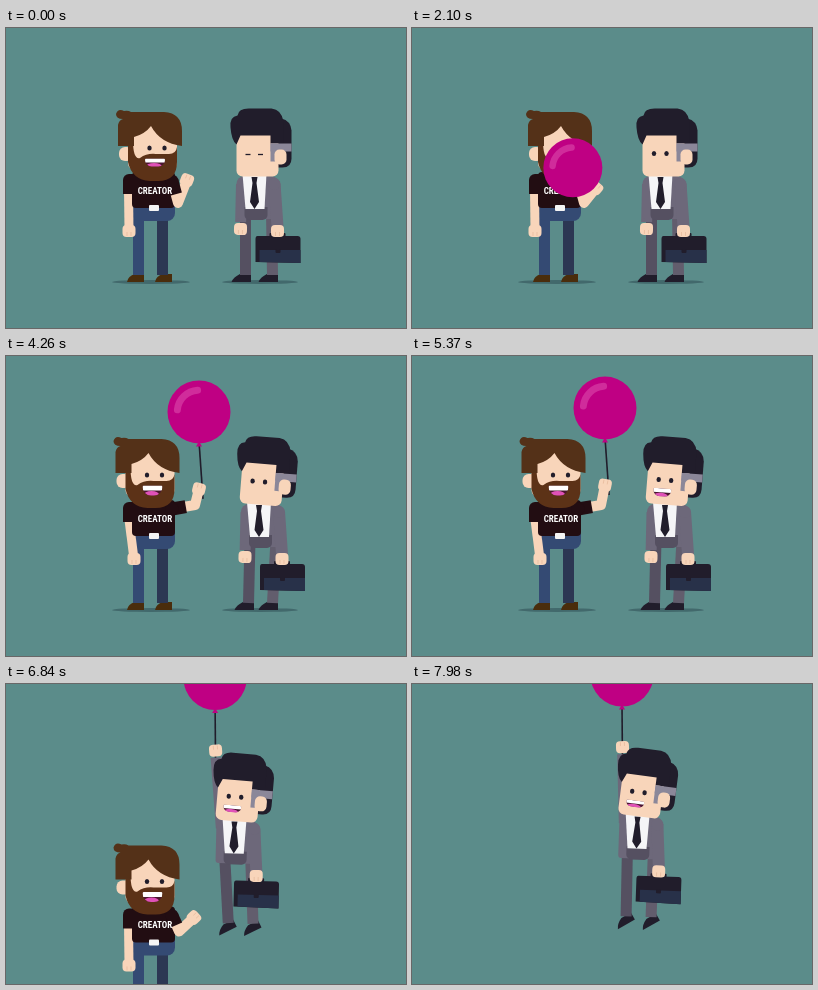
An HTML page with a canvas for the animation above (8 s loop, 400x300 px).

```html
<!DOCTYPE html>
<html lang="en">
<head>
<meta charset="utf-8">
<title>Balloon</title>
<style>
html, body { margin: 0; width: 100%; height: 100%; overflow: hidden; background: #5b8c8a; }
canvas { display: block; width: 400px; height: 300px; }
</style>
</head>
<body>
<canvas id="stage"></canvas>
<script>
const LOOP = 8000;
const canvas = document.getElementById('stage');
const ratio = window.devicePixelRatio || 1;
canvas.width = 400 * ratio;
canvas.height = 300 * ratio;
const c = canvas.getContext('2d');

const color = {
  back: '#5b8c8a', shadow: '#42696c', skin: '#f8d5ba', crease: '#e5b99b',
  brown: '#543118', beard: '#5c3217', shirt: '#220d12', jeans: '#344a73', jeansDark: '#2c3753', boot: '#4a2d0c',
  suit: '#6d687a', suitDark: '#555061', ink: '#211d2b', grey: '#8b8799', navy: '#283149',
  balloon: '#bf0083', shine: '#d02c9b', tongue: '#e052b8'
};

const mix = (a, b, u) => a + (b - a) * u;
const mixPoint = (a, b, u) => [mix(a[0], b[0], u), mix(a[1], b[1], u)];
const add = (p, x, y) => [p[0] + x, p[1] + y];

function ramp(t, start, end) {
  const u = Math.min(1, Math.max(0, (t - start) / (end - start)));
  return u * u * (3 - 2 * u);
}

function box(fill, x, y, w, h, r = 0) {
  c.fillStyle = fill;
  c.beginPath();
  c.roundRect(x, y, w, h, r);
  c.fill();
}

function oval(fill, x, y, rx, ry = rx) {
  c.fillStyle = fill;
  c.beginPath();
  c.ellipse(x, y, rx, ry, 0, 0, Math.PI * 2);
  c.fill();
}

function shape(fill, d) {
  c.fillStyle = fill;
  c.fill(new Path2D(d));
}

function line(stroke, width, points, cap = 'butt') {
  c.strokeStyle = stroke;
  c.lineWidth = width;
  c.lineCap = cap;
  c.lineJoin = 'round';
  c.beginPath();
  points.forEach(p => c.lineTo(...p));
  c.stroke();
}

function group([x, y], angle, draw) {
  c.save();
  c.translate(x, y);
  c.rotate(angle);
  draw();
  c.restore();
}

const pointing = (from, to) => Math.atan2(to[0] - from[0], from[1] - to[1]);

function hand(at, angle) {
  group(at, angle, () => {
    box(color.skin, -6.5, -6, 13, 12, 4);
    for (const x of [-2, 2]) line(color.crease, 0.7, [[x, -5], [x, -1]]);
  });
}

function eyes(xs, y, closed) {
  for (const x of xs) {
    if (closed) line(color.ink, 1.3, [[x - 2.5, y + 1], [x + 2.5, y + 1]]);
    else oval(color.ink, x, y, 2.2, 2.5);
  }
}

function mouth(x, y, w, h) {
  if (h < 0.5) return;
  const curve = Math.min(h, w / 2) * 0.9;
  c.save();
  c.beginPath();
  c.roundRect(x - w / 2, y, w, h, [1.5, 1.5, curve, curve]);
  c.clip();
  box('#4b1630', x - w / 2, y, w, h);
  oval(color.tongue, x - 1, y + h, w * 0.4, h * 0.45);
  box('#fff', x - w / 2, y, w, h * 0.5);
  c.restore();
}

// Picks the largest size whose natural width fits on the chest.
function lettering() {
  c.textAlign = 'center';
  c.textBaseline = 'middle';
  c.fillStyle = '#fff';
  let size = 13.5;
  do {
    size -= 0.5;
    c.font = `bold extra-condensed ${size}px "Roboto Condensed", Roboto, "Noto Sans", sans-serif`;
  } while (c.measureText('CREATOR').width > 36 && size > 6);
  c.fillText('CREATOR', 149, 163);
}

// Everything that moves, derived from the progress of each action.
function scene(t) {
  const hold = ramp(t, 700, 1100);
  const raise = ramp(t, 3270, 3700);
  const reach = ramp(t, 5600, 6270);
  const release = ramp(t, 5800, 6200);
  const lift = ramp(t, 6250, 7100);
  const sway = lift * Math.sin((t - 6270) / 1500 * Math.PI * 2);
  const bob = ramp(t, 4000, 4300) * (1 - reach) * 2 * Math.cos((t - 4260) / 740 * Math.PI * 2);

  const radius = 12 * ramp(t, 1000, 1400) + 18 * ramp(t, 1650, 2150) + 1.5 * raise;
  let balloon = mixPoint([152 + radius * 0.3, 136 + radius * 0.13], [193, 54], raise);
  balloon = mixPoint(balloon, [206, 6], reach);
  balloon = add(mixPoint(balloon, [210, -7], lift), 0, bob - 2.5 * sway);

  const elbow = mixPoint(mixPoint([172, 175], [189, 149], raise), [173, 169], release);
  const talkHand = mixPoint([181, 152], [184, 160], hold);
  const makerHand = mixPoint(mixPoint(talkHand, add(balloon, 0, 77), raise), [188, 155], release);

  const grip = add(balloon, 0.5, 72);
  let body = mixPoint([248.5, 148], [253, 148], raise);
  body = mixPoint(mixPoint(body, [241, 141], reach), add(grip, 17.5, 68), lift);
  const free = add(body, -14, 53);
  const foot = (planted, hanging) =>
    mixPoint(add([planted, 246], -1.5 * reach, -2 * reach), add(body, hanging, 100), lift);

  return {
    balloon, radius, sway, lift, grip,
    drop: 226 * ramp(t, 6480, 7390),
    string: release < 0.4 ? add(makerHand, 4, 10) : add(grip, 0, 20),
    maker: {
      elbow, hand: makerHand,
      head: [4 * ramp(t, 1000, 1500) - 6.5 * raise, -1 * raise],
      restHand: [123 + 5 * raise * (1 - release), 203],
      mouth: mix(mix(8 + 3 * Math.sin(t / 75), 3, hold), 10, raise),
      blink: t > 4700 && t < 4800
    },
    suit: {
      body,
      hand: add(mixPoint(free, grip, reach), -30 * Math.sin(Math.PI * reach), 0),
      feet: [foot(239.5 + 3 * raise, -8), foot(266.5, 17)],
      toes: -0.25 * reach - 0.3 * lift,
      tilt: 0.08 * raise * (1 - reach) + 0.12 * sway,
      mouth: 8 * ramp(t, 4850, 5100) - 1.5 * lift,
      blink: t < 110 || (t > 2800 && t < 2900)
    }
  };
}

function creatorHead({ mouth: open, blink }) {
  box(color.skin, 113, 119, 14, 14, 6);
  box(color.skin, 122, 94, 49, 48, 7);
  shape(color.beard, 'M122 112H127Q127 132 134 130Q141 125 150 126H163Q170 126 171 119V134Q171 153 152 153H144Q126 152 122 134Z');
  shape(color.brown, 'M112 118V97Q113 92 117 91Q110 91 110 86Q112 80 118 83Q122 82 125 84' +
    'H158Q176 85 176 103V118Q154 115 145 98Q139 106 128 109V118Z');
  eyes([143.5, 158.5], 120, blink);
  mouth(149, 130.5, 20, open);
}

function creator(pose) {
  oval(color.shadow, 145, 254, 39, 2);
  for (const x of [121, 149]) shape(color.boot, `M${x} 254Q${x + 1} 248 ${x + 8} 246H${x + 17}V254Z`);
  box(color.jeansDark, 151, 182, 11, 65);
  box(color.jeans, 127, 182, 11, 65);
  box(color.jeans, 126, 175, 43, 18, [0, 0, 8, 8]);

  line(color.skin, 9, [[122.5, 160], pose.restHand]);
  hand(pose.restHand, Math.PI);
  box(color.shirt, 117, 146, 14, 20, [6, 0, 0, 0]);
  box(color.shirt, 126, 144, 43, 36, 4);
  box('#f4f4f4', 143, 177, 10, 6, 1);

  const shoulder = [166, 153];
  line(color.skin, 10, [shoulder, pose.elbow, pose.hand], 'round');
  line(color.shirt, 13, [shoulder, mixPoint(shoulder, pose.elbow, 0.6)]);
  oval(color.shirt, 166, 153, 6.5);
  lettering();
  hand(pose.hand, pointing(pose.elbow, pose.hand));
  group(pose.head, 0, () => creatorHead(pose));
}

function manHead({ mouth: open, blink }, lookUp) {
  shape(color.ink, 'M14-36H28Q37-34 38-24V4Q38 13 29 13H15Z');
  box(color.skin, -17, -24, 42, 46, 6);
  shape(color.ink, 'M-23-27Q-24-38-16-39Q-15-46-5-46H18Q28-45 30-33V-11H17V-19H-13L-17-10Q-22-14-23-27Z');
  box(color.grey, 17, -11, 21, 8);
  box(color.grey, 17, -11, 7, 18);
  box(color.skin, 21, -5, 12, 15, 5);
  eyes([-5.5, 7], -1 - 1.5 * lookUp, blink);
  mouth(-1, 9 - 3 * lookUp, 18, open);
}

function man(pose) {
  const { body, feet, hand: high } = pose;
  const shoulder = add(body, -13, 8);
  const bag = add(body, 23, 55);

  const leg = (foot, hip, fill) => {
    group(foot, pose.toes, () => shape(color.ink, 'M5.5 0V8H-14Q-12 3-5.5 0Z'));
    line(fill, 11, [add(body, hip, 36), add(foot, 0, 1)]);
  };
  leg(feet[1], 17, '#625d6d');
  leg(feet[0], -9, color.suitDark);

  const length = Math.hypot(high[0] - shoulder[0], high[1] - shoulder[1]);
  line(color.suit, 11, [shoulder, mixPoint(shoulder, high, 1 - 7 / length)]);
  hand(high, pointing(shoulder, high));

  group(body, 0, () => {
    box(color.suit, -18, 0, 44, 43, [8, 10, 3, 3]);
    box(color.suitDark, -10, 31, 23, 13, [0, 0, 5, 5]);
    shape('#f5f5f7', 'M-12-2H12L10 33H-9Z');
    shape(color.ink, 'M-3 1H3L2 7L4.5 26L0 33L-4.5 26L-2 7Z');
  });

  group(bag, 0, () => {
    line(color.ink, 2, [[-7, 8], [-7, 3], [7, 3], [7, 8]]);
    shape(color.ink, 'M-20 5H20Q23 5 23 8V32L-22 31V8Q-22 5-20 5Z');
    shape(color.navy, 'M-18 19H23V32L-18 31Z');
    box(color.ink, -2, 18, 5, 4, 1);
  });
  line(color.suit, 12, [add(body, 20, 8), add(body, 21, 22), add(bag, 0, -4)]);
  oval(color.suit, body[0] + 20, body[1] + 8, 6);
  hand(bag, Math.PI);

  group(add(body, -1, -21.5), pose.tilt, () => manHead(pose, pose.mouth / 8));
}

function balloon([x, y], r) {
  oval(color.balloon, x, y, r);
  c.strokeStyle = color.shine;
  c.lineWidth = r * 0.22;
  c.lineCap = 'round';
  c.beginPath();
  c.arc(x, y, r * 0.69, Math.PI * 1.03, Math.PI * 1.48);
  c.stroke();
}

function draw(t) {
  c.setTransform(ratio, 0, 0, ratio, 0, 0);
  box(color.back, 0, 0, 400, 300);

  const s = scene(t);
  if (t > 3300) {
    const knot = add(s.balloon, 0, s.radius - 2);
    line(color.ink, 1.6, [knot, s.string]);
    shape(color.balloon, `M${knot}l3 5h-6Z`);
  }

  oval(color.shadow, 254, 254 + s.drop, 38 - 14 * s.lift, 2);
  group([0, s.drop], 0, () => creator(s.maker));
  if (s.radius > 0) balloon(s.balloon, s.radius);

  // Once airborne, the man swings around his grip on the string.
  group(s.grip, 0.045 * s.sway, () => {
    c.translate(-s.grip[0], -s.grip[1]);
    man(s.suit);
  });
}

function tick() {
  draw(performance.now() % LOOP);
  requestAnimationFrame(tick);
}
tick();
</script>
</body>
</html>
```
